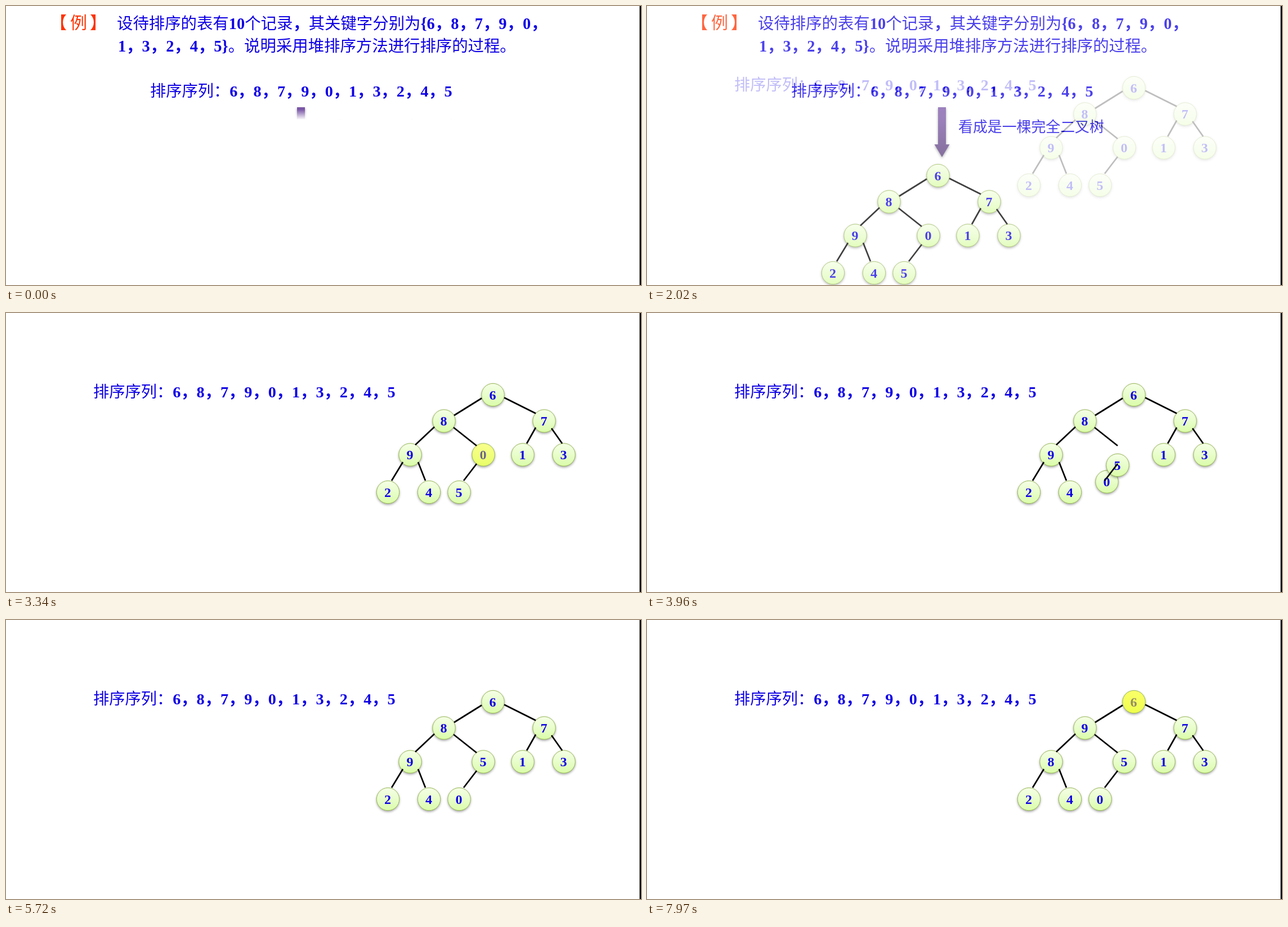
Write an HTML page with a canvas that moves like this. It is 1128 px wide and 496 px high and loops after 8 s.

```html
<!DOCTYPE html>
<html lang="zh-CN">
<head>
<meta charset="utf-8">
<title>堆排序</title>
<style>
  html, body { margin: 0; width: 100%; height: 100%; overflow: hidden; background: #fff; }
  canvas { position: absolute; left: 0; top: 0; }
</style>
</head>
<body>
<canvas id="intro" width="1128" height="496"></canvas>
<canvas id="heap" width="1128" height="496"></canvas>
<script>
const W = 1128, H = 496, LOOP = 8000, SAMPLE = 77.4;
const BLUE = [15, 0, 228], YELLOW = [255, 255, 0], RED = '#ff3300';
const FONT = '"Liberation Serif", "Noto Sans CJK SC", "Noto Sans CJK", serif';
const SEQUENCE = '排序序列：6，8，7，9，0，1，3，2，4，5';

const heapCanvas = document.getElementById('heap');
const intro = document.getElementById('intro').getContext('2d');
const heap = heapCanvas.getContext('2d');

// Key -> starting position in the tree; insertion order is stacking order.
const nodes = new Map([
  [6, [865, 145.5]], [8, [778, 192]], [7, [956, 192]], [9, [718, 252]],
  [0, [848, 252]], [1, [918, 252]], [3, [991, 252]],
  [2, [678.5, 318.5]], [4, [751.5, 318.5]], [5, [805, 318.5]]
]);
const edges = [
  [845, 151.5, 796, 182], [885, 150.5, 941, 178.5], [761, 202.5, 727, 234.5],
  [795, 203.5, 836, 236], [941, 203.5, 925, 232], [969, 205, 988, 232],
  [705, 265, 685, 298], [732, 265, 745, 298], [836, 268, 813, 298]
];
const swaps = [
  { a: 0, b: 5, start: 3634, length: 500 },
  { a: 9, b: 8, start: 6560, length: 480 }
];
const pulses = [
  { key: 0, start: 2925, length: 500 },
  { key: 9, start: 4152, length: 500 },
  { key: 7, start: 4652, length: 500 },
  { key: 8, start: 5152, length: 500 },
  { key: 6, start: 7580, length: 540 }
];

const progress = (t, start, length) => Math.min(1, Math.max(0, (t - start) / length));
const easeInOut = p => p < 0.5 ? 2 * p * p : 1 - 2 * (1 - p) ** 2;
const mix = (a, b, p) => a.map((v, i) => v + (b[i] - v) * p);
const rgb = c => `rgb(${c.map(Math.round).join()})`;

function write(ctx, text, x, y, size, color = rgb(BLUE)) {
  ctx.fillStyle = color;
  ctx.textAlign = 'left';
  // Digits and commas are bold, Chinese characters lighter.
  for (const run of text.match(/[\d{}，]+|[^\d{}，]+/g)) {
    ctx.font = `${/[\d{}，]/.test(run) ? 700 : 500} ${size}px ${FONT}`;
    ctx.fillText(run, x, y);
    x += ctx.measureText(run).width;
  }
}

function withShadow(ctx, paint) {
  ctx.save();
  ctx.shadowColor = 'rgba(0,0,0,.4)';
  ctx.shadowBlur = 4;
  ctx.shadowOffsetY = 2;
  paint();
  ctx.restore();
}

function drawNode(ctx, key, [x, y], glow) {
  const fill = ctx.createLinearGradient(0, y + 20, 0, y - 20);
  fill.addColorStop(0, rgb(mix([218, 253, 167], YELLOW, glow)));
  fill.addColorStop(0.35, rgb(mix([228, 253, 194], YELLOW, glow)));
  fill.addColorStop(1, rgb(mix([245, 255, 230], YELLOW, glow)));
  ctx.beginPath();
  ctx.arc(x, y, 20.2, 0, 7);
  ctx.fillStyle = fill;
  withShadow(ctx, () => ctx.fill());
  ctx.strokeStyle = '#98b954';
  ctx.lineWidth = 1;
  ctx.stroke();
  ctx.font = `700 24px ${FONT}`;
  ctx.textAlign = 'center';
  ctx.fillStyle = rgb(mix(BLUE, YELLOW, glow));
  ctx.fillText(key, x - 0.5, y + 8);
}

function nodePosition(key, t) {
  let position = nodes.get(key);
  for (const { a, b, start, length } of swaps) {
    if (key !== a && key !== b) continue;
    const other = nodes.get(key === a ? b : a);
    position = mix(position, other, easeInOut(progress(t, start, length)));
  }
  return position;
}

function nodeGlow(key, t) {
  const pulse = pulses.find(p => p.key === key);
  return pulse ? 1 - Math.abs(2 * progress(t, pulse.start, pulse.length) - 1) : 0;
}

function drawTree(ctx, t) {
  for (const key of nodes.keys()) drawNode(ctx, key, nodePosition(key, t), nodeGlow(key, t));
  ctx.strokeStyle = '#000';
  ctx.lineWidth = 2.7;
  ctx.beginPath();
  for (const [x1, y1, x2, y2] of edges) {
    ctx.moveTo(x1, y1);
    ctx.lineTo(x2, y2);
  }
  ctx.stroke();
}

function drawArrow(ctx) {
  const fill = ctx.createLinearGradient(0, 268, 0, 180);
  fill.addColorStop(0, '#5d417e');
  fill.addColorStop(0.8, '#7b58a6');
  fill.addColorStop(1, '#7b57a8');
  ctx.fillStyle = fill;
  withShadow(ctx, () => ctx.fill(new Path2D('M517 180H531V246H537.5L524 268.5L510.5 246H517Z')));
}

// Soft-edged wipe: hides everything below the moving front.
function wipe(ctx, top, bottom, feather, p) {
  if (p >= 1) return;
  const front = top + (bottom - top + feather) * p;
  const veil = ctx.createLinearGradient(0, front - feather, 0, front);
  veil.addColorStop(0, 'rgba(255,255,255,0)');
  veil.addColorStop(1, '#fff');
  ctx.fillStyle = veil;
  ctx.fillRect(0, front - feather, W, H);
}

function beginSlide(ctx) {
  ctx.fillStyle = '#fff';
  ctx.fillRect(0, 0, W, H);
}

function endSlide(ctx) {
  ctx.fillStyle = '#000';
  ctx.fillRect(1125.5, 0, 2.5, H);
}

function drawIntro(t) {
  beginSlide(intro);
  write(intro, '【', 78, 40, 30, RED);
  write(intro, '例', 114, 40, 30, RED);
  write(intro, '】', 149, 40, 30, RED);
  write(intro, '设待排序的表有10个记录，其关键字分别为{6，8，7，9，0，', 197, 41, 28.4);
  write(intro, '1，3，2，4，5}。说明采用堆排序方法进行排序的过程。', 199, 80.5, 28.4);
  write(intro, SEQUENCE, 256, 160.5, 28.25);
  drawArrow(intro);
  write(intro, '看成是一棵完全二叉树', 553, 223.5, 25.9);
  wipe(intro, 180, 270, 18, progress(t, -100, 487));
  const shown = progress(t, 780, 470);
  if (shown > 0) {
    intro.save();
    intro.translate(-348, 156);
    drawTree(intro, 0);
    intro.restore();
    wipe(intro, 280, 498, 38, shown);
  }
  endSlide(intro);
}

function drawHeap(t) {
  beginSlide(heap);
  write(heap, SEQUENCE, 155, 149.5, 28.25);
  drawTree(heap, t);
  endSlide(heap);
}

function frame() {
  // Motion advances at about thirteen pictures a second.
  const t = Math.floor((performance.now() % LOOP) / SAMPLE + 0.2) * SAMPLE;
  const fade = progress(t, 1858, 618);
  heapCanvas.style.opacity = fade;
  if (fade < 1) drawIntro(t);
  if (fade > 0) drawHeap(t);
  requestAnimationFrame(frame);
}
frame();
</script>
</body>
</html>
```
